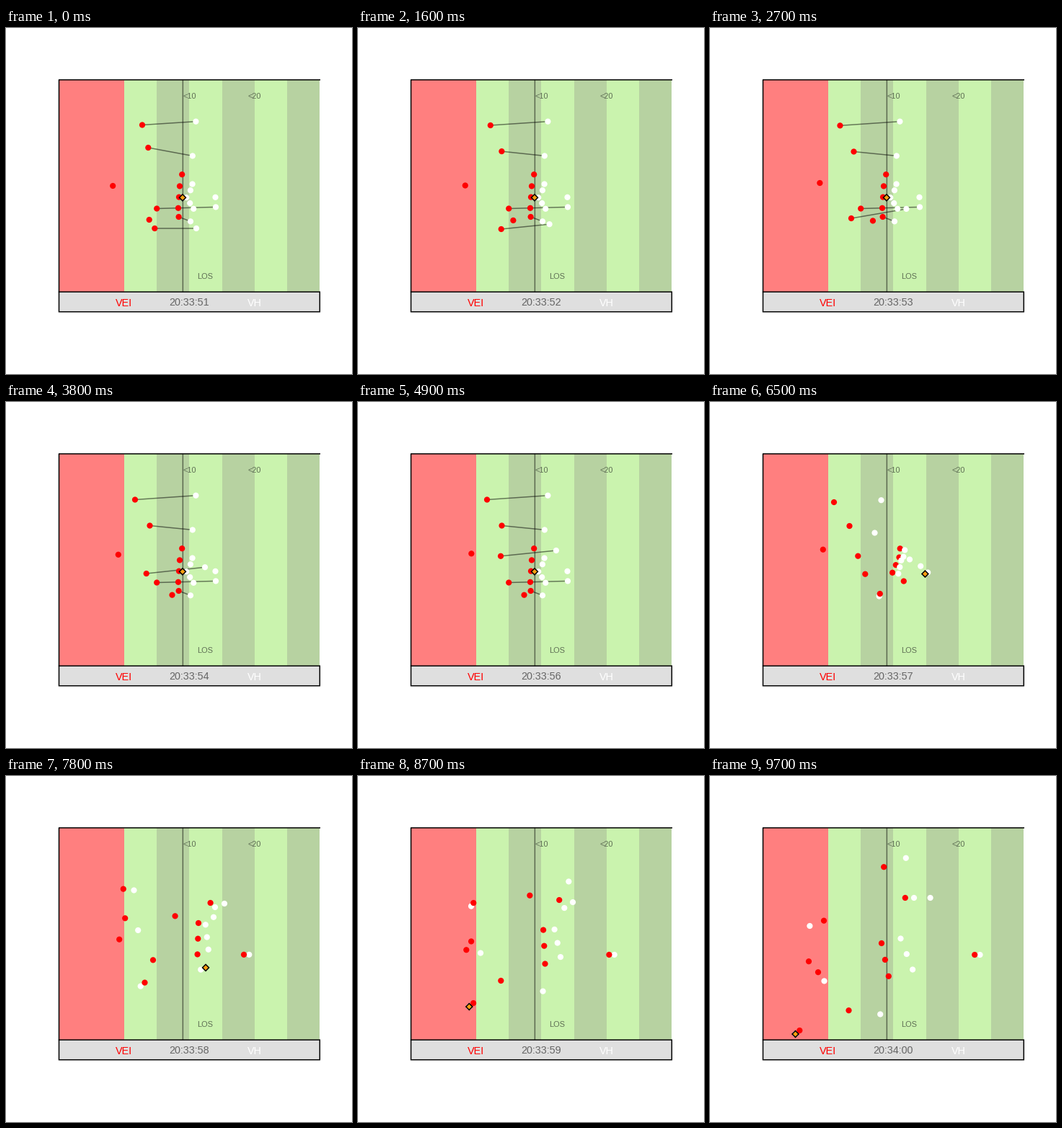
A matplotlib script that plays this animation: 480 by 480 pixels, repeating every 9.8 s.

```python
import numpy as np
import matplotlib.pyplot as plt
from matplotlib.animation import FuncAnimation
from matplotlib.collections import LineCollection
from matplotlib.patches import Polygon, Rectangle

plt.rcParams["font.family"] = "Liberation Sans"

SIZE, DPI = 480, 100
FRAMES, STEP = 98, 100
PT = 72 / DPI  # points per pixel
TIMES = np.arange(FRAMES) * STEP / 1000

SNAP, THROW, CATCH = 5.1, 7.3, 8.6
RUN = (6.5, 7.8, 9.7)

LEFT, RIGHT, TOP, FOOT = 73.5, 435.3, 71.9, 393.7
YARD = (RIGHT - LEFT) / 40
BASE = TOP + (FOOT - TOP) * 53.3 / 58.3
SCRIMMAGE = LEFT + 19 * YARD


def ramp(t0, t1):
    return np.clip((TIMES - t0) / (t1 - t0), 0, 1)[:, None]


def mix(a, b, u):
    return a + (b - a) * u


def glide(times, points):
    """Monotone cubic through timed points, sampled at every frame."""
    times, points = np.array(times), np.array(points, float)
    h = np.diff(times)[:, None]
    d = np.diff(points, axis=0) / h
    same = d[:-1] * d[1:] > 0
    mean = 2 * d[:-1] * d[1:] / np.where(same, d[:-1] + d[1:], 1)
    slope = np.vstack([d[:1], np.where(same, mean, 0), d[-1:]])
    t = np.clip(TIMES, times[0], times[-1])
    k = np.clip(np.searchsorted(times, t, side="right") - 1, 0, len(h) - 1)
    u = (t - times[k])[:, None] / h[k]
    return (mix(points[k], points[k + 1], u * u * (3 - 2 * u))
            + u * (1 - u) * h[k] * ((1 - u) * slope[k] - u * slope[k + 1]))


def route(stance, *run, lead=(), settle=4.9):
    """Optional walk (t, x, y) into the stance, hold to the snap, then run."""
    times = [p[0] for p in lead] + [settle, SNAP, *RUN[:len(run)]]
    return glide(times, [p[1:] for p in lead] + [stance, stance, *run])


def unit(n, *rows):
    """Players side by side: each row is (x, y, dx, dy)."""
    return [route(*[(x + k * dx, y + k * dy) for x, y, dx, dy in rows])
            for k in range(n)]


def chase(track, target, gap):
    """Leave a track after the snap and close in on another player."""
    u = ramp(SNAP, RUN[1])
    return mix(track, target + np.array(gap), u * u * (3 - 2 * u))


# Offence
wide_a = route((263.4, 129.7), (237.5, 136.2), (177.5, 158.5), (138.4, 208))
wide_b = route((258.8, 177.4), (228.5, 181.5), (183.2, 214), (158.5, 284.4))
slot = route((256, 268.3), (234.7, 269.5), (186.7, 291.6), (118.5, 358))
mover = route((274.9, 206), (277, 218.4), (270.2, 268.6), (236.2, 330.5),
              lead=[(1.3, 264, 278), (3.8, 276, 229.2)])
runner = route((291, 248.4), (292.2, 227.7), (303, 177), (271.8, 113.8))
passer = route((290.5, 234.8), (302.2, 236.5), (337.3, 247.8), (374.5, 248))
skill = [wide_a, wide_b, slot, mover, runner, passer]
line = (unit(2, (258.6, 216.5, -2.7, 8.7), (270.2, 205.4, -1.8, 9.3),
             (290, 182, -2, 13.8), (305.6, 169, -22.6, 0))
        + unit(3, (250.2, 235.2, 5, 7.8), (265.3, 219.8, -2, 9.2),
               (276.8, 206.3, 2, 17.2), (264.5, 225.5, 8.3, 21.5)))

# Defence
corner_a = route((179, 135.5), (172, 139), (162.8, 156.7), (158, 200.7),
                 lead=[(0, 189, 134.5)], settle=3.8)
corner_b = route((199.5, 171.5), (193.5, 172), (165.2, 197.3), (150, 272.2),
                 lead=[(0, 197.3, 166)], settle=2)
safety = route((157.3, 210.3), (156.8, 204.7), (157.2, 226.7), (137, 257.2),
               lead=[(1.4, 148.2, 219)])
chaser = route((198, 213.8), (205.3, 213.7), (234.6, 194.3), (241.2, 126.2),
               lead=[(0, 206.3, 278), (1.6, 198.7, 279), (3.8, 194.7, 238)])
backer = route((209.2, 250.5), (215.3, 238.7), (204, 255.3), (192.5, 325.2))
tackle = route((244.2, 203.2), (263.7, 203.3), (283.6, 176), (270.8, 169))
rush = unit(3, (241, 219.4, -1, 15.2), (262.5, 215.5, -4.7, 10.6),
            (267, 204, -0.7, 21.7), (238, 232, 4.9, 22.9))
edge = chase(route((239.6, 262)), passer, (-7.3, 0))
walker = chase(route((230.5, 267.7), lead=[(0, 198.7, 266)], settle=3.8),
               slot, (5.8, -5))
defence = [corner_a, corner_b, safety, chaser, backer, tackle, *rush, edge, walker]

matchups = [(corner_a, wide_a), (corner_b, wide_b), (chaser, mover),
            (backer, runner), (edge, slot)]

# Ball: snapped to the passer, thrown to the slot receiver
held = mix(np.array([SCRIMMAGE - 0.4, 235.3]), passer + np.array([-3.8, 2]),
           ramp(SNAP, SNAP + 0.5))
ball = mix(held, slot, ramp(THROW, CATCH))

fig = plt.figure(figsize=(SIZE / DPI, SIZE / DPI), dpi=DPI, facecolor="white")
ax = fig.add_axes([0, 0, 1, 1])
ax.set(xlim=(0, SIZE), ylim=(SIZE, 0))
ax.axis("off")


def band(yard, width, color):
    ax.add_patch(Rectangle((LEFT + yard * YARD, TOP), width * YARD, BASE - TOP,
                           fc=color, lw=0))


def rule(xs, ys, **kw):
    ax.plot(xs, ys, color="black", lw=1.5 * PT, snap=False, zorder=2, **kw)


def label(x, y, text, px, color):
    return ax.text(x, y, text, fontsize=px * PT, color=color,
                   ha="center", va="baseline", zorder=3)


band(0, 10, "#ff7f7f")
for n in range(6):
    band(10 + 5 * n, 5, "#b7d2a1" if n % 2 else "#caf3ae")
ax.add_patch(Rectangle((LEFT, BASE), RIGHT - LEFT, FOOT - BASE, fc="#dfdfdf",
                       ec="black", lw=1.5 * PT, snap=False, zorder=2))
rule([RIGHT, LEFT, LEFT], [TOP, TOP, BASE])
rule([SCRIMMAGE, SCRIMMAGE], [TOP, BASE], alpha=0.5, solid_capstyle="butt")

GREY = "#5f7055"
for yard in (10, 20):
    label(LEFT + (10 + yard) * YARD, 98, f"<{yard}", 11, GREY)
label(276.3, 348, "LOS", 11, GREY)
label(163.7, 386, "VEI", 14.4, "red")
label(344.6, 386, "VH", 14.4, "white")
clock = label(254, 385, "", 14.4, "#666666")

links = LineCollection([], colors=(0, 0, 0, 0.5), linewidths=1.5 * PT,
                       snap=False, zorder=4)
ax.add_collection(links)

players = np.array(skill + defence + line)
colors = ["white"] * len(skill) + ["red"] * len(defence) + ["white"] * len(line)
dots = ax.scatter(*players[:, 0].T, s=(8.2 * PT) ** 2, c=colors, lw=0, zorder=5)

DIAMOND = 4.5 * np.array([(0, -1), (1, 0), (0, 1), (-1, 0)])
marker = Polygon(ball[0] + DIAMOND, fc="#ffa010", ec="black", lw=1.5 * PT,
                 snap=False, zorder=6)
ax.add_patch(marker)


def update(i):
    dots.set_offsets(players[:, i])
    marker.set_xy(ball[i] + DIAMOND)
    waiting = TIMES[i] < SNAP - 0.01
    links.set_segments([[a[i], b[i]] for a, b in matchups] if waiting else [])
    s = 51 + (i + 1) // 10
    clock.set_text(f"20:{33 + s // 60}:{s % 60:02d}")
    return links, dots, marker, clock


anim = FuncAnimation(fig, update, frames=FRAMES, interval=STEP,
                     repeat=True, repeat_delay=0, blit=False)
plt.show()
```
